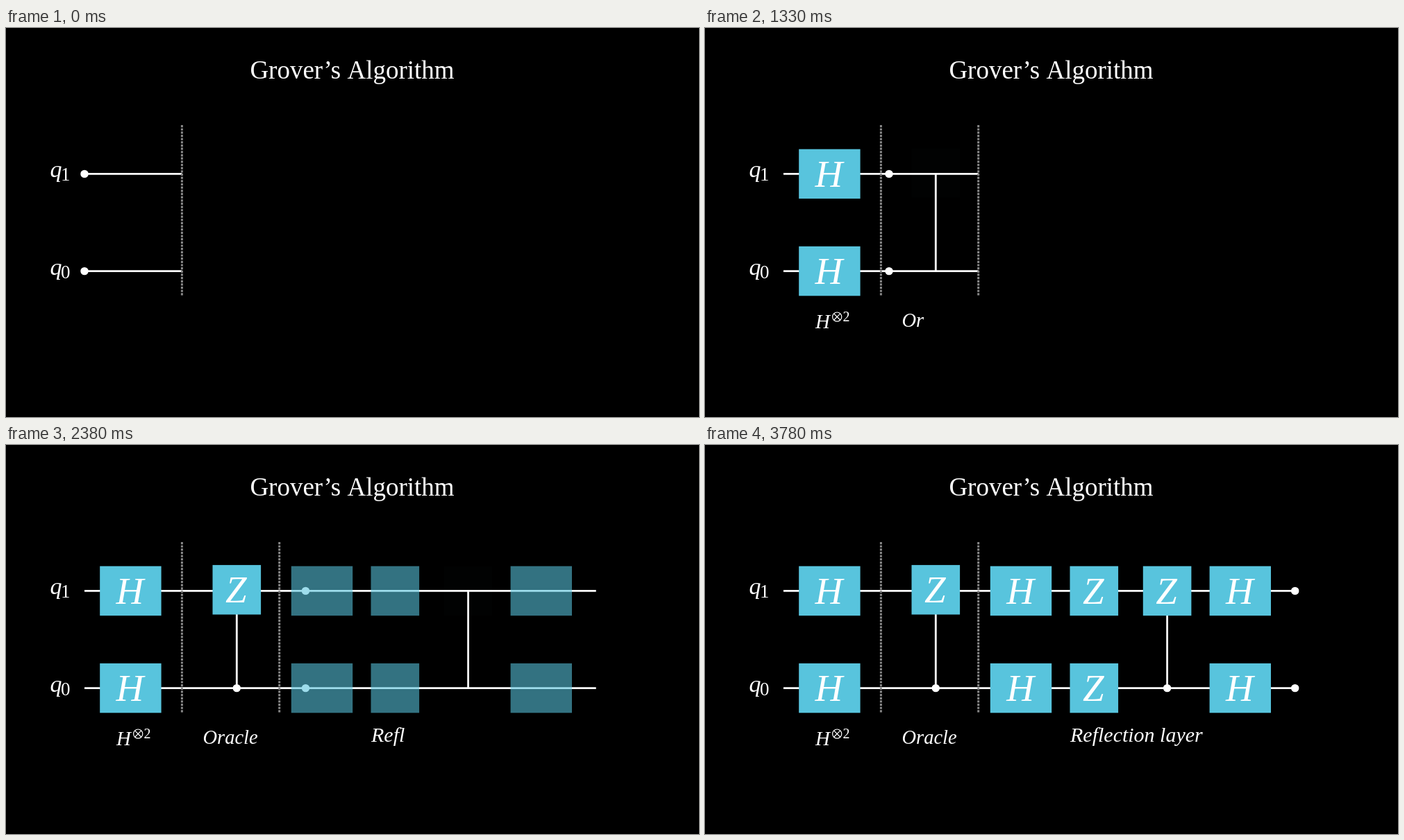
Animation, 998 px wide and 561 px high, one loop 5.25 s. Source, as an HTML page with a canvas:

```html
<!DOCTYPE html>
<html lang="en">
<head>
<meta charset="utf-8">
<title>Grover's Algorithm</title>
<style>
html, body { margin: 0; width: 100%; height: 100%; overflow: hidden; background: #000; }
canvas { display: block; }
</style>
</head>
<body>
<canvas id="stage" width="998" height="561"></canvas>
<script>
const ctx = document.getElementById('stage').getContext('2d');
const LOOP = 5250, TICK = 70, PHASE = 1050;
const BLUE = '#58c4dd', WHITE = '#fff';
const WIRES = [210.4, 350.6];
const STOPS = [113, 253.4, 393.7, 849.7];
const SERIF = '"Liberation Serif", serif';

const clamp = v => Math.max(0, Math.min(1, v));
const sigmoid = v => 1 / (1 + Math.exp(-v));
const smooth = v => {
  const err = sigmoid(-5);
  return clamp((sigmoid(10 * (clamp(v) - 0.5)) - err) / (1 - 2 * err));
};
// Progress of one part when parts play one after another
const part = (x, count, i) => smooth(x * count - i);

function line(x1, y1, x2, y2, width = 2.8) {
  ctx.lineWidth = width;
  ctx.beginPath();
  ctx.moveTo(x1, y1);
  ctx.lineTo(x2, y2);
  ctx.stroke();
}

// Circle traced counterclockwise from the right, closed by a chord
function sweep(x, y, r, f) {
  ctx.beginPath();
  ctx.arc(x, y, r, 0, -2 * Math.PI * f, true);
  ctx.closePath();
}

function dot(x, y, f = 1) {
  if (f <= 0) return;
  sweep(x, y, 5.7, f);
  ctx.fill();
}

function text(str, x, y, size, style = '', align = 'left') {
  ctx.font = `${style} ${size}px ${SERIF}`;
  ctx.textAlign = align;
  ctx.fillText(str, x, y);
}

// Text drawn inside a growing sweep
function traced(str, x, y, size, cx, f, style = 'italic', align = 'left') {
  if (f <= 0) return;
  ctx.save();
  if (f < 1) {
    sweep(cx, y - size * 0.33, size, f);
    ctx.clip();
  }
  text(str, x, y, size, style, align);
  ctx.restore();
}

function box(cx, cy, w, alpha) {
  ctx.globalAlpha = alpha;
  ctx.fillStyle = BLUE;
  ctx.fillRect(cx - w / 2, cy - 35.7, w, 71.4);
  ctx.globalAlpha = 1;
  ctx.fillStyle = WHITE;
}

const letter = (name, cx, cy, f) =>
  traced(name, cx - 1, cy + 18.6, 55, cx, f, 'italic', 'center');

function gatePair(name, cx, x) {
  for (const cy of WIRES) {
    box(cx, cy, name === 'H' ? 88.4 : 69.6, part(x, 2, 0));
    letter(name, cx, cy, part(x, 2, 1));
  }
}

function controlledZ(cx, cy, x) {
  const [top, bottom] = WIRES;
  const grown = part(x, 4, 0);
  if (grown > 0) line(cx, bottom, cx, bottom - (bottom - top) * grown);
  box(cx, cy, 69.6, part(x, 4, 1));
  letter('Z', cx, cy, part(x, 4, 2));
  dot(cx, bottom, part(x, 4, 3));
}

// Progress of the i-th glyph; each outline closes a little early
const glyph = (x, count, i) => clamp((x * count - i) * 1.25);

function typed(str, left, y, size, x) {
  const total = str.replace(/ /g, '').length;
  let count = 0;
  for (let i = 0; i < str.length; i++) {
    if (str[i] === ' ') continue;
    ctx.font = `italic ${size}px ${SERIF}`;
    const at = left + ctx.measureText(str.slice(0, i)).width;
    traced(str[i], at, y, size, at + size * 0.2, glyph(x, total, count++));
  }
}

function tensorSign(cx, cy, r, f) {
  if (f <= 0) return;
  if (f < 1) {
    sweep(cx, cy, r + 0.6, Math.min(f, 0.3));
    ctx.fill();
  }
  const d = r * Math.SQRT1_2;
  ctx.save();
  if (f < 1) {
    sweep(cx, cy, r + 0.6, f);
    ctx.clip();
  }
  ctx.lineWidth = 1.2;
  sweep(cx, cy, r, 1);
  ctx.stroke();
  line(cx - d, cy - d, cx + d, cy + d, 1.2);
  line(cx - d, cy + d, cx + d, cy - d, 1.2);
  ctx.restore();
}

function tensorLabel(x) {
  traced('H', 159, 433, 29, 170, glyph(x, 3, 0));
  tensorSign(190.2, 416.6, 6.6, glyph(x, 3, 1));
  traced('2', 198.5, 422.5, 20, 203.5, glyph(x, 3, 2), '');
}

function draw(t) {
  const phase = Math.min(2, Math.floor(t / PHASE));
  const x = clamp((t - phase * PHASE) / PHASE);
  const progress = i => i < phase ? 1 : i === phase ? x : 0;
  const [prep, oracle, reflect] = [0, 1, 2].map(progress);

  ctx.fillStyle = '#000';
  ctx.fillRect(0, 0, 998, 561);
  ctx.fillStyle = ctx.strokeStyle = WHITE;

  text('Grover’s Algorithm', 498.5, 73, 37, '', 'center');
  const from = STOPS[phase], to = STOPS[phase + 1];
  WIRES.forEach((y, i) => {
    text('q', 63.5, y + 5, 34, 'italic');
    text(String(1 - i), 79, y + 10, 27);
    line(STOPS[0], y, to, y);
    dot(from + (to - from) * smooth(x), y);
  });

  ctx.strokeStyle = '#888';
  ctx.setLineDash([3.2, 1.46]);
  for (let i = 1; i <= Math.min(2, phase + 1); i++)
    line(STOPS[i], 140, STOPS[i], 386, 3);
  ctx.setLineDash([]);
  ctx.strokeStyle = WHITE;

  gatePair('H', 179.4, prep);
  controlledZ(332.3, 208.8, oracle);
  gatePair('H', 455, reflect);
  gatePair('Z', 560.3, reflect);
  controlledZ(665.6, 210.4, reflect);
  gatePair('H', 770.8, reflect);

  tensorLabel(prep);
  typed('Oracle', 283.5, 430.5, 28.5, oracle);
  typed('Reflection layer', 526, 427.5, 30, reflect);
}

const start = performance.now();
function frame() {
  const t = (performance.now() - start) % LOOP;
  draw(Math.floor(t / TICK) * TICK);
  requestAnimationFrame(frame);
}
frame();
</script>
</body>
</html>
```
